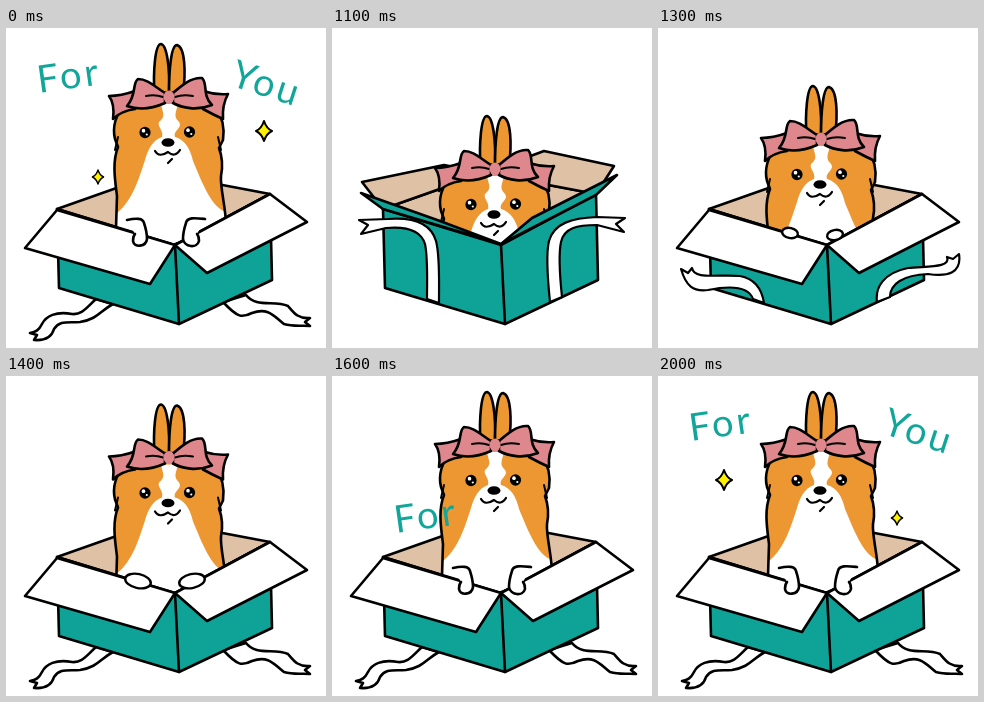
These frames come from a looping animation (320x320 px, 2100 ms). An HTML page:

```html
<!DOCTYPE html>
<html lang="en">
<head>
<meta charset="utf-8">
<title>Gift box</title>
<style>
html, body { margin: 0; height: 100%; overflow: hidden; background: #fff; }
svg { display: block; width: 100vw; height: 100vh; stroke-linecap: round; stroke-linejoin: round; }
text { font: 38px Lato, sans-serif; letter-spacing: 3px; fill: #12a69b; }
</style>
</head>
<body>
<svg id="stage" viewBox="0 0 320 320"></svg>
<script>
const TEAL = '#0fa397', TAN = '#dfc1a6', ORANGE = '#ed9733', PINK = '#de888d';
const stage = document.getElementById('stage');

const path = (d, fill = 'none', width = 2.6, stroke = '#000') =>
  `<path d="${d}" fill="${fill}" stroke="${stroke}" stroke-width="${width}"/>`;
const fillOnly = (d, fill) => path(d, fill, 0, 'none');
const oval = (x, y, rx, ry, fill, width = 0, turn = 0) =>
  `<ellipse cx="${x}" cy="${y}" rx="${rx}" ry="${ry}" fill="${fill}" stroke="#000" stroke-width="${width}" transform="rotate(${turn} ${x} ${y})"/>`;
const group = (transform, content) => `<g transform="${transform}">${content}</g>`;

// Bow centred on its knot
const bow = color =>
  path('M-34 -6Q-48 -1 -60 -1Q-54 7 -56 22Q-48 14 -34 12Z', color) +
  path('M34 -6Q46 -2 59 -3Q53 8 54 22Q45 18 34 12Z', color) +
  path('M-4 -4C-14 -10 -21 -18 -31 -18C-37 -14 -32 -2 -42 9C-28 14 -13 10 -4 6Z', color) +
  path('M4 -4C12 -11 22 -20 33 -19C39 -14 33 -1 43 8C28 14 13 11 4 6Z', color) +
  path('M-23 -1Q-14 -3 -6 0M24 -1Q14 -3 6 0', 'none', 2) +
  oval(0, 0, 5.5, 6.5, color);

const eye = (x, y) => oval(x, y, 5.6, 5.8, '#000') +
  oval(x - 1.5, y - 1.8, 1.8, 1.9, '#fff') + oval(x + 1.8, y + 2, 1.1, 1.1, '#fff');

const body = 'M118 78C110 86 106 99 109 111L112 119C106 134 109 152 111 168L110 200L167 217L220 197' +
  'C220 180 214 160 215 148C217 138 216 128 213 120L217 112C219 99 216 88 209 78C188 60 140 60 118 78Z';

const dog = dy => group(`translate(0 ${dy})`,
  path('M148.5 66C147 44 149 16 155 16C161 17 164 40 163 66Z', ORANGE) +
  path('M163 66C163 42 165 17 171 17C179 19 180 44 177 66Z', ORANGE) +
  fillOnly(body, ORANGE) +
  fillOnly('M155 76C157 86 160 88 153 94C151 99 158 102 156 109C147 112 142 121 139 132' +
    'C133 150 127 172 111 185L110 200L167 217L220 197V184C205 179 196 154 187 133C184 120 179 112 169 109' +
    'C167 102 177 100 173 94C167 88 170 85 172 76Z', '#fff') +
  path(body) +
  path('M112 109L109 122M212 109L215 122', 'none', 2) +
  eye(139, 104.5) + eye(183.5, 104) +
  oval(162, 114.5, 6.5, 4.3, '#000') +
  path('M149 123Q153 130 162 124Q169 130 174 122M166 131L162 135', 'none', 2.2) +
  group('translate(163 69)', bow(PINK)));

const faces = path('M51 181L53 260L173 296L266 252L264 166L169 217Z', TEAL) + path('M169 217L173 296');
const inside = path('M51 181L153 145L264 166L169 217Z', TAN);

const closedBox = () => faces +
  path('M51 181L153 145L264 166L169 217Z', TEAL) +
  path('M96 194L197 153L209 155L108 198V275L96 271Z', '#fff', 2.2) +
  path('M98 163L112 158L228 187L232 269L219 274L217 191Z', '#fff', 2.2) +
  path('M51 181L169 217L264 166') +
  path('M97 190L100 168L105 189ZM213 186L220 165L223 185Z', '#fff', 2) +
  group('translate(158 170) scale(.96 .78)', bow('#f39b99'));

const openingBox = dy =>
  inside +
  path('M51 181L30 154L112 137L153 145Z', TAN) +
  path('M264 166L282 138L212 123L153 145Z', TAN) +
  dog(dy) + faces +
  path('M51 181L29 165L108 193L169 216Z', TEAL) +
  path('M169 216L200 190L285 147L264 167Z', TEAL) +
  path('M107 275C107 250 108 228 104 213C99 196 82 189 56 191L27 192L36 197L29 206L54 200C76 198 89 203 93 216C96 230 95 250 95 271Z', '#fff', 2.2) +
  path('M218 274C215 245 214 225 217 213C222 195 240 190 265 189L293 190L284 196L292 204L265 197C245 197 232 200 229 214C226 228 228 250 230 269Z', '#fff', 2.2);

const fallingRibbon =
  path('M23 241L30 245L34 240C36 252 60 246 82 248C98 251 104 262 106 275L95 271C90 257 70 258 50 262C35 264 28 258 23 241Z', '#fff', 2.2) +
  path('M301 226L295 231L289 229C293 240 270 238 250 240C225 245 217 260 219 274L232 269C232 256 245 247 270 246C290 249 304 245 301 226Z', '#fff', 2.2);

const groundRibbon =
  path('M90 271C80 280 76 287 66 286C50 283 40 288 36 296C33 302 30 304 24 305L31 307L28 312C40 313 46 308 48 301C54 292 62 295 74 294C92 291 94 283 107 276Z', '#fff') +
  path('M217 274C232 290 236 290 246 285C262 279 268 288 278 296C288 299 296 297 304 298L299 294L304 290C292 291 288 285 282 278C268 272 250 280 240 267Z', '#fff');

const flaps =
  path('M51 182L19 220L144 256L169 217Z', '#fff') +
  path('M169 217L201 245L301 194L264 166Z', '#fff');

const paws = {
  peek: oval(132, 205, 8, 5, '#fff', 2.4, 12) + oval(177, 207, 8, 5, '#fff', 2.4, -12),
  lean: oval(132, 205, 13, 7, '#fff', 2.4, 12) + oval(186, 205, 13, 7, '#fff', 2.4, -12),
  hang: path('M121 192C130 190 137 190 138 195C140 201 141 206 141 211C140 219 128 220 127 213Q127 208 129 206', '#fff') +
    path('M199 191C189 190 181 189 180 195C178 201 177 206 177 211C178 219 191 221 193 213Q193 208 191 206', '#fff')
};

const openBox = (dy, pose) => pose === 'peek'
  ? inside + dog(dy) + faces + fallingRibbon + flaps + paws.peek
  : groundRibbon + inside + dog(dy) + faces + flaps + paws[pose];

const word = (text, x, y, turn) => `<text transform="translate(${x} ${y}) rotate(${turn})">${text}</text>`;
const forWord = (dx = 0, dy = 0) => word('For', 33 + dx, 65 + dy, -8);
const youWord = (dx = 0, dy = 0) => word('You', 223 + dx, 57 + dy, 18);

const sparkle = (x, y, size) => group(`translate(${x} ${y}) scale(${size})`,
  path('M0 -10Q2.5 -2.5 8 0Q2.5 2.5 0 10Q-2.5 2.5 -8 0Q-2.5 -2.5 0 -10Z', '#fff000', 2));
const sparklesA = sparkle(258, 103, 1) + sparkle(92, 149, .7);
const sparklesB = sparkle(66, 104, 1) + sparkle(239, 142, .7);

const standing = openBox(0, 'hang');
const greeting = standing + forWord() + youWord();

// The first scene holds for a second, the rest for 100 ms each
const scenes = [
  greeting + sparklesA,
  closedBox(),
  openingBox(72),
  openingBox(61),
  openBox(42, 'peek'),
  openBox(12.5, 'lean'),
  standing,
  standing + forWord(31, 92),
  standing + forWord() + youWord(-31, 92),
  greeting,
  greeting + sparklesA,
  greeting + sparklesB
];

let shown = -1;
const start = performance.now();
function draw() {
  const t = (performance.now() - start) % 2100;
  const scene = t < 1000 ? 0 : Math.floor(t / 100) - 9;
  if (scene !== shown) stage.innerHTML = scenes[shown = scene];
  requestAnimationFrame(draw);
}
draw();
</script>
</body>
</html>
```
